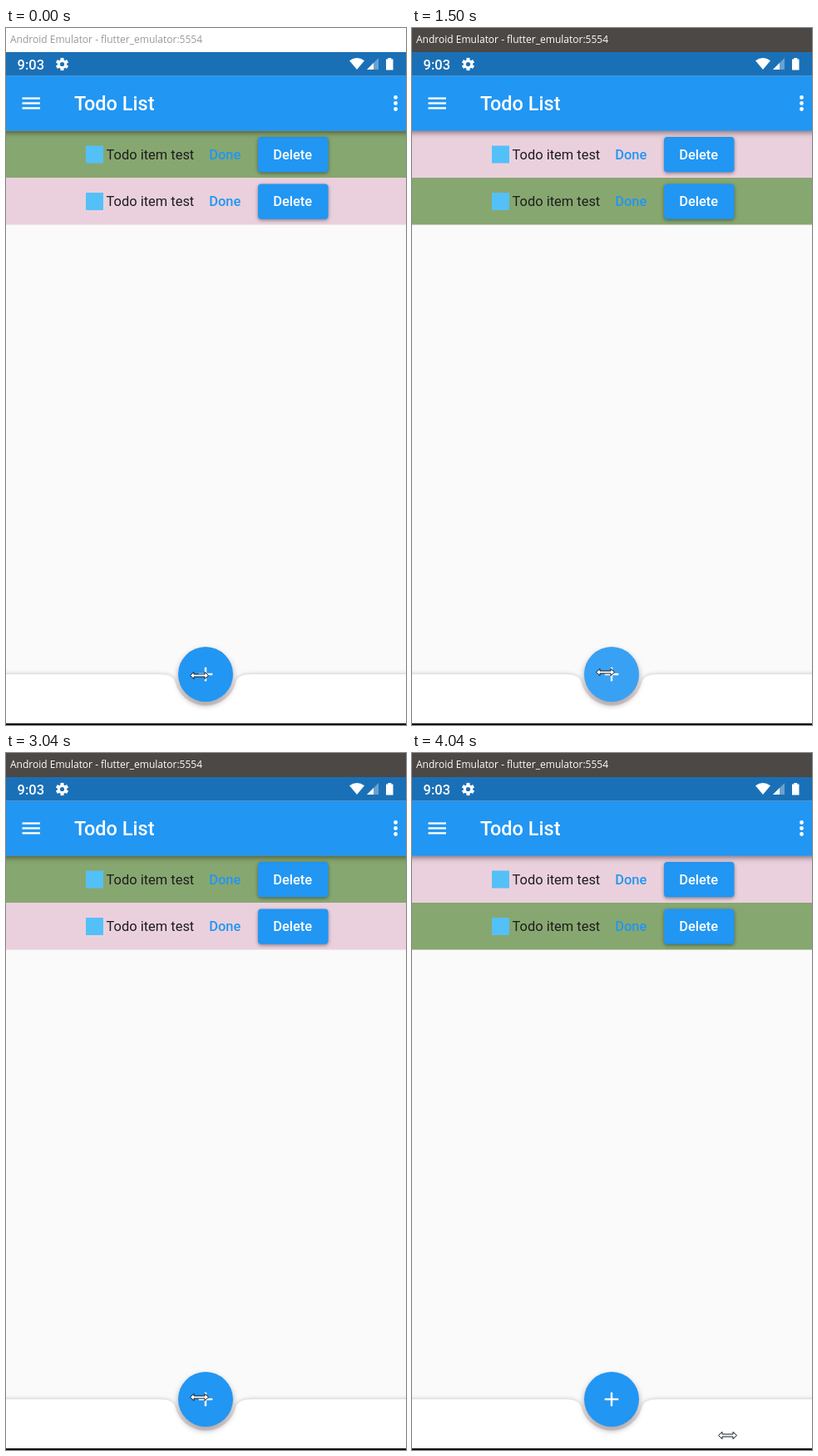
An HTML page with a canvas for the animation above (4130 ms loop, 481 px wide and 838 px high).

```html
<!DOCTYPE html>
<html lang="en">
<head>
<meta charset="utf-8">
<title>Todo List</title>
<style>
html, body { margin: 0; width: 100%; height: 100%; overflow: hidden; background: #fafafa; }
canvas { display: block; width: 481px; height: 838px; }
</style>
</head>
<body>
<canvas id="stage" width="481" height="838"></canvas>
<script>
const ctx = document.getElementById('stage').getContext('2d');
const W = 481, H = 838, LOOP = 4130, DP = 1.175;
const BLUE = '#2196f3', GREEN = '#87a770', PINK = '#ead0dd';
const FAB = { x: 240, y: 777, r: 33 };

// press, release, moment the two rows swap
const CLICKS = [
  [80, 150, 220], [790, 940, 1010], [1290, 1360, 1430],
  [1720, 1790, 1860], [2100, 2170, 2240], [2680, 2760, 2830],
  [2970, 3040, 3110], [3470, 3540, 3610], [3760, 3820, 3890]
];

function rect(x, y, w, h, color) {
  ctx.fillStyle = color;
  ctx.fillRect(x, y, w, h);
}

function disc(x, y, r, color) {
  ctx.fillStyle = color;
  ctx.beginPath();
  ctx.arc(x, y, r, 0, Math.PI * 2);
  ctx.fill();
}

function poly(points, color) {
  ctx.fillStyle = color;
  ctx.beginPath();
  points.forEach(([x, y]) => ctx.lineTo(x, y));
  ctx.closePath();
  ctx.fill();
}

function text(str, x, y, font, color) {
  ctx.font = font;
  ctx.fillStyle = color;
  ctx.fillText(str, x, y);
}

function withShadow(color, blur, dy, draw) {
  ctx.save();
  ctx.shadowColor = color;
  ctx.shadowBlur = blur;
  ctx.shadowOffsetY = dy;
  draw();
  ctx.restore();
}

const roboto = (size, weight = 400) => `${weight} ${size}px Roboto, sans-serif`;

function titleBar(active) {
  rect(0, 0, W, 29, active ? '#4b4845' : '#fff');
  text('Android Emulator - flutter_emulator:5554', 5, 18,
    '12px "Open Sans", sans-serif', active ? '#fff' : '#999');
}

function gear(x, y) {
  ctx.save();
  ctx.translate(x, y);
  for (let i = 0; i < 6; i++) {
    rect(-2, -7.6, 4, 4, '#fff');
    ctx.rotate(Math.PI / 3);
  }
  ctx.restore();
  disc(x, y, 5.6, '#fff');
  disc(x, y, 2.6, '#1a70b7');
}

function statusBar() {
  rect(0, 29, W, 28.5, '#1a70b7');
  text('9:03', 13.5, 49.5, roboto(16.5, 500), '#fff');
  gear(67.5, 43.5);

  ctx.fillStyle = '#fff';
  ctx.beginPath();
  ctx.moveTo(422, 50);
  ctx.lineTo(413, 39.2);
  ctx.quadraticCurveTo(422, 32.6, 431, 39.2);
  ctx.fill();

  poly([[434, 50], [448, 50], [448, 36]], 'rgba(255,255,255,.35)');
  poly([[434, 50], [442, 50], [442, 42]], '#fff');
  rect(457, 37.5, 8.5, 13, '#fff');
  rect(459.3, 36, 4, 2, '#fff');
}

function appBar() {
  withShadow('rgba(0,0,0,.5)', 7, 2, () => rect(-10, 57.5, W + 20, 66, BLUE));
  statusBar();
  for (let i = -1; i <= 1; i++) {
    rect(19.5, 89.3 + i * 5.9, 21.5, 2.35, '#fff');
    disc(468.5, 90.5 + i * 7, 2.4, '#fff');
  }
  text('Todo List', 82, 99, roboto(23.5, 500), '#fff');
}

function row(y, color) {
  rect(0, y, W, 56.5, color);
  rect(96, y + 18, 21, 21, '#54c0f8');
  text('Todo item test', 120.6, y + 34.3, roboto(16.45), '#1d1d1d');
  text('Done', 244.2, y + 34.3, roboto(16.45, 500), BLUE);
  withShadow('rgba(0,0,0,.4)', 4, 1.5, () => {
    ctx.fillStyle = BLUE;
    ctx.beginPath();
    ctx.roundRect(303, y + 7.4, 84.5, 42.3, 4);
    ctx.fill();
  });
  text('Delete', 321.2, y + 34.3, roboto(16.45, 500), '#fff');
}

function bottomBar() {
  const r = 32 * DP, lip = 33 * DP, start = 48 * DP;
  const dx = r * r / lip, dy = Math.sqrt(r * r - dx * dx);
  const angle = Math.atan2(dy, dx);
  const { x, y } = FAB;
  withShadow('rgba(0,0,0,.2)', 5, -0.5, () => {
    ctx.fillStyle = '#fff';
    ctx.beginPath();
    ctx.moveTo(-10, y);
    ctx.lineTo(x - start, y);
    ctx.quadraticCurveTo(x - lip, y, x - dx, y + dy);
    ctx.arc(x, y, r, Math.PI - angle, angle, true);
    ctx.quadraticCurveTo(x + lip, y, x + start, y);
    ctx.lineTo(W + 10, y);
    ctx.lineTo(W + 10, H + 10);
    ctx.lineTo(-10, H + 10);
    ctx.fill();
  });
  rect(0, 836, W, 2, '#0a0a0a');
}

function addButton(glow) {
  const { x, y, r } = FAB;
  withShadow('rgba(60,30,40,.42)', 7, 4, () => disc(x, y, r, BLUE));
  if (glow) disc(x, y, r, `rgba(255,255,255,${glow})`);
  rect(x - 8.3, y - 1.2, 16.6, 2.4, '#fff');
  rect(x - 1.2, y - 8.3, 2.4, 16.6, '#fff');
}

function cursor(x, y) {
  const quarter = [[-11, 0], [-6.5, -4.2], [-6.5, -1.5]];
  const top = [...quarter, ...quarter.slice(1).reverse().map(([a, b]) => [-a, b])];
  const outline = [...top, [11, 0], ...top.slice(1).reverse().map(([a, b]) => [a, -b])];
  ctx.save();
  ctx.translate(x, y);
  poly(outline, '#fff');
  ctx.strokeStyle = '#101820';
  ctx.lineWidth = 1;
  ctx.stroke();
  ctx.restore();
}

function glowAt(t) {
  const last = CLICKS.filter(c => c[2] <= t).pop();
  if (!last) return 0;
  const age = t - last[2];
  return age < 80 ? 0.1 : age < 145 ? 0.05 : 0;
}

function draw(t) {
  const swapped = CLICKS.filter(c => c[2] <= t).length % 2 === 1;
  const pressed = CLICKS.some(([down, up]) => t >= down && t < up);

  rect(0, 0, W, H, '#fafafa');
  row(123.5, swapped ? PINK : GREEN);
  row(180, swapped ? GREEN : PINK);
  appBar();
  titleBar(t >= 80);
  bottomBar();
  addButton(glowAt(t));

  if (t >= 4040) cursor(379.5, 820.5);
  else cursor(232.5, t < 80 ? 778.5 : 774.5);
  if (pressed) disc(232, 774, 12, 'rgba(255,239,0,.45)');
}

const origin = performance.now();
function tick() {
  draw((performance.now() - origin) % LOOP);
  requestAnimationFrame(tick);
}
tick();
</script>
</body>
</html>
```
